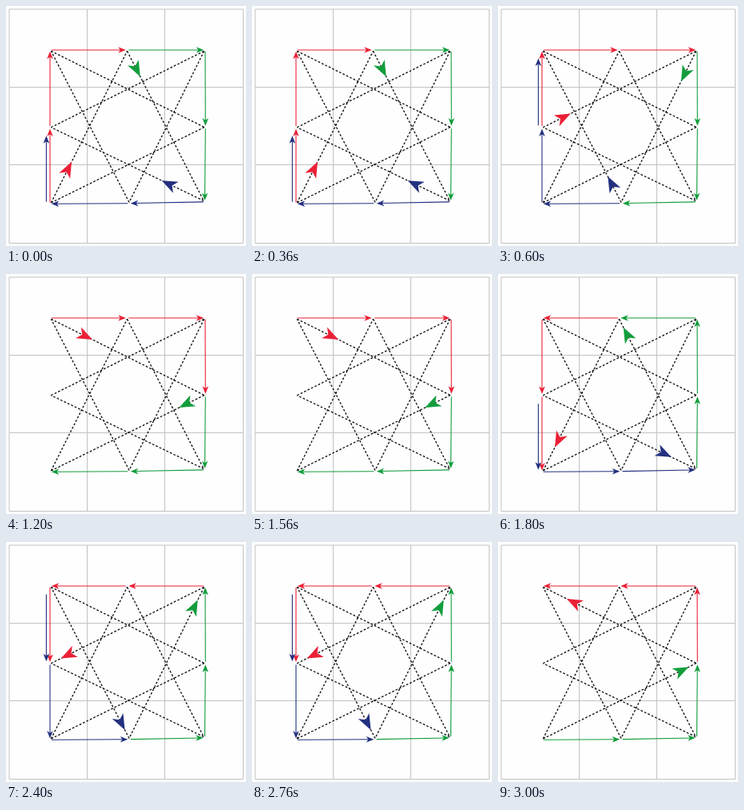
An HTML page that plays this animation: 300x300 px, repeating every 3.6 s.

```html
<!DOCTYPE html>
<html lang="en">
<head>
<meta charset="utf-8">
<title>Arrows around a star</title>
<style>
html, body { margin: 0; width: 100%; height: 100%; overflow: hidden; background: #fefefe; }
svg { display: block; width: 100vw; height: 100vh; }
</style>
</head>
<body>
<svg viewBox="0 0 300 300">
  <path d="M4 4H296.5V296.5H4ZM101.5 4V296.5M198.5 4V296.5M4 101.5H296.5M4 198.5H296.5"
        fill="none" stroke="#c2c2c2"/>
  <path id="star" fill="none" stroke="#111" stroke-width="1.35" stroke-dasharray="2.7 2.2"/>
  <g id="arrows"></g>
</svg>
<script>
const STEP = 600;
const COLORS = ['#ea2036', '#129d3c', '#23307f'];
const CENTER = [150.5, 151];

// Stations clockwise from the top left: x, y, and how far along
// the chord leaving the station its big arrowhead points.
const stations = [
  [55, 55, 0.27], [151.5, 55, 0.17], [249, 55, 0.2], [249.3, 151.5, 0.165],
  [248.5, 244.8, 0.275], [154, 246.7, 0.17], [55, 247.3, 0.27], [55, 151.7, 0.18]
];
const at = i => stations[i % 8];
// The star sits slightly inside the square.
const tip = i => CENTER.map((c, k) => c + (at(i)[k] - c) * 0.986);
const mix = (a, b, u) => a.map((v, k) => v + (b[k] - v) * u);
const angle = (a, b) => Math.atan2(b[1] - a[1], b[0] - a[0]);

function head([x, y], a, len, half, color) {
  return `<path fill="${color}" transform="translate(${x} ${y}) rotate(${a * 180 / Math.PI})" ` +
    `d="M0 0L${-len} ${-half}L${-len * 0.73} 0L${-len} ${half}Z"/>`;
}

function arrow(from, to, inset, color) {
  const a = angle(from, to);
  const move = (p, d) => [p[0] + d * Math.cos(a), p[1] + d * Math.sin(a)];
  const end = move(to, -inset);
  return `<path d="M${move(from, inset)}L${move(end, -5)}" stroke="${color}" stroke-width="1.1"/>` +
    head(end, a, 9.5, 3.8, color);
}

// One side of the square; an overlapping side is drawn apart on the left.
function side(i, back, apart, color) {
  const ends = [at(i), at(i + 1)].map(([x, y]) => apart ? [x - 4.6, y + 4] : [x, y]);
  if (back) ends.reverse();
  return arrow(ends[0], ends[1], apart ? 6.5 : 1.7, color);
}

function chordHead(i, back, color) {
  const a = tip(i), b = tip(i + 3);
  const u = at(i)[2] - (back ? 0.115 : 0);
  return head(mix(a, b, u), back ? angle(b, a) : angle(a, b), 19.6, 7.7, color);
}

// Each colour covers three sides and the chord that sums them;
// the second half of the loop reverses every arrow.
function picture(step) {
  const turn = step % 3, back = step > 2;
  let sides = '', heads = '';
  COLORS.forEach((color, c) => {
    if (turn === 2 && c === 2) return;
    const start = 6 + turn + 3 * c;
    for (let i = 0; i < 3; i++)
      sides += side(start + i, back, c === 2 && i === 2, color);
    heads += chordHead(start, back, color);
  });
  return sides + heads;
}

document.getElementById('star').setAttribute('d',
  stations.map((_, i) => `M${tip(i)}L${tip(i + 3)}`).join(''));

const layer = document.getElementById('arrows');
let shown = -1;

function draw(t) {
  const step = Math.floor(t / STEP) % 6;
  if (step !== shown) layer.innerHTML = picture(shown = step);
}

const began = performance.now();
function tick() {
  draw(performance.now() - began);
  requestAnimationFrame(tick);
}
tick();
</script>
</body>
</html>
```
